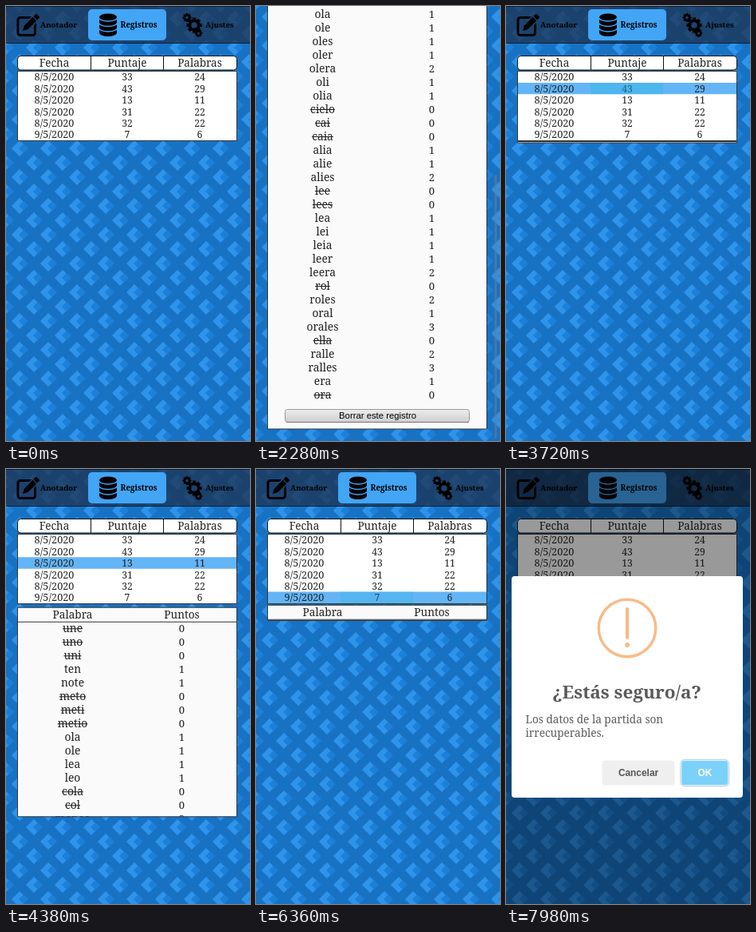
An HTML page with a canvas for the animation above (8000 ms loop, 306x544 px).

```html
<!DOCTYPE html>
<html lang="es">
<head>
<meta charset="utf-8">
<style>
html, body { margin: 0; width: 100%; height: 100%; overflow: hidden; background: #1872c4 }
canvas { display: block }
</style>
</head>
<body>
<canvas id="c" width="306" height="544"></canvas>
<script>
const W = 306, H = 544, LOOP = 8000, SLIDE = 300;
const g = document.getElementById('c').getContext('2d');
const SERIF = '"Noto Serif", serif', SANS = '"Liberation Sans", Arial, sans-serif';
const NAV = '#1c4270';

const games = [
  ['8/5/2020', 33, 24], ['8/5/2020', 43, 29], ['8/5/2020', 13, 11],
  ['8/5/2020', 31, 22], ['8/5/2020', 32, 22], ['9/5/2020', 7, 6]
];
// each word is followed by its points; zero means struck out
const words = {
  0: 'sal0 sol0 cal1 cola0 col0 rio1 sola0 cielos1 lio0 ola1 ole1 oles1 oler1 olera2 oli1 olia1 cielo0 cai0 caia0 alia1 alie1 alies2 lee0 lees0 lea1 lei1 leia1 leer1 leera2 rol0 roles2 oral1 orales3 ella0 ralle2 ralles3 era1 ora0',
  1: 'mar0 mares1 mesa1 mesas2 rama0 ramas1 amar1 amare2 sea0 seas1 arte1 artes2 tres0 tela1 telas2 meta0 metas1 tema1 temas2 rata1 ratas2 trama2 tramas3 lame1 lames2 alma0 almas1 mate1 mates2 alta1 altas2 resta2 restas3',
  2: 'une0 uno0 uni0 ten1 note1 meto0 meti0 metio0 ola1 ole1 lea1 leo1 cola0 col0 menee2 meneo2 ceno0 ene1 cene0 cole0 lee1 leen1',
  5: 'alma1 cala1 prisa2 gris1 asi1 para1'
};
for (const k in words) words[k] = words[k].split(' ').map(w => [w.slice(0, -1), w.slice(-1)]);

const taps = [[940, 0], [3712, 1], [4209, 2], [6292, 5]];   // time, row
const scrolls = [[0, 0], [1760, 0], [2280, 344.5], [2600, 344.5], [2940, 0],
  [4700, 0], [4920, 72.5], [5495, 72.5], [5700, 0]];
const bars = [[1760, 3340, 0], [4700, 5260, 2], [5495, 6040, 2]];   // shown from, until, row

const clamp = v => Math.max(0, Math.min(1, v));
const swing = v => .5 - Math.cos(clamp(v) * Math.PI) / 2;
const boxHeight = row => 52 + 17 * words[row].length;
const pageHeight = row => Math.max(H, 190.5 + boxHeight(row));

function track(keys, t) {
  let i = keys.length - 1;
  while (i && keys[i][0] > t) i--;
  const [t0, a] = keys[i], [t1, b] = keys[i + 1] || [LOOP, a];
  return a + (b - a) * swing((t - t0) / (t1 - t0));
}

function rect(x, y, w, h, fill, stroke, r = 0, lw = 1) {
  g.beginPath();
  g.roundRect(x, y, w, h, r);
  if (fill) { g.fillStyle = fill; g.fill(); }
  if (stroke) { g.strokeStyle = stroke; g.lineWidth = lw; g.stroke(); }
}

function text(s, x, y, size, { font = SERIF, weight = 400, color = '#222', align = 'center' } = {}) {
  g.font = `${weight} ${size}px ${font}`;
  g.fillStyle = color;
  g.textAlign = align;
  g.fillText(s, x, y);
}

function poly(pts, fill) {
  g.beginPath();
  pts.forEach(([x, y]) => g.lineTo(x, y));
  g.closePath();
  g.fillStyle = fill;
  g.fill();
}

function ellipse(x, y, rx, ry, fill) {
  g.beginPath();
  g.ellipse(x, y, rx, ry, 0, 0, 7);
  g.fillStyle = fill;
  g.fill();
}

const circle = (x, y, r, fill) => ellipse(x, y, r, r, fill);

const tile = document.createElement('canvas');
tile.width = tile.height = 36;
{
  const q = tile.getContext('2d');
  const diamond = (x, y, r, fill) => {
    q.fillStyle = fill;
    q.beginPath();
    q.moveTo(x - r, y); q.lineTo(x, y - r); q.lineTo(x + r, y); q.lineTo(x, y + r);
    q.fill();
  };
  q.fillStyle = '#1872c4';
  q.fillRect(0, 0, 36, 36);
  for (const [x, y] of [[18, 34], [18, -2], [0, 16], [36, 16]]) {
    diamond(x - 1, y, 10, '#2f93ea');
    diamond(x + 4, y, 6, '#1c7fd8');
  }
}
const pattern = g.createPattern(tile, 'repeat');

function gear(x, y, r, hole) {
  for (let i = 0; i < 8; i++) {
    g.save();
    g.translate(x, y);
    g.rotate(i * Math.PI / 4);
    rect(-r * .22, -r, r * .44, r, '#000');
    g.restore();
  }
  circle(x, y, r * .78, '#000');
  circle(x, y, hole, NAV);
}

function nav() {
  rect(0, 0, W, 47, 'rgba(29,50,81,.75)');
  rect(0, 0, W, 1, '#0c2238');
  rect(0, 46, W, 1, '#0c2238');
  rect(103, 4, 98, 39, '#42a5f5', null, 5);
  // pencil and sheet
  rect(15, 14.5, 21.5, 22, null, '#000', 3, 3);
  g.save();
  g.translate(21, 31);
  g.rotate(-Math.PI / 4);
  rect(-1, -5, 31, 10, NAV);
  poly([[0, 0], [6, -3.3], [21, -3.3], [21, 3.3], [6, 3.3]], '#000');
  rect(22.3, -3.3, 5, 6.6, '#000', null, 1.5);
  g.restore();
  // database
  rect(117, 14, 22, 19.5, '#000');
  ellipse(128, 14, 11, 4.5, '#000');
  ellipse(128, 33.5, 11, 4.5, '#000');
  g.strokeStyle = '#42a5f5';
  g.lineWidth = 1.4;
  for (const y of [14.5, 21, 27.5]) {
    g.beginPath();
    g.ellipse(128, y, 11.5, 4.5, 0, 0, Math.PI);
    g.stroke();
  }
  gear(227, 14.5, 5.5, 1.8);
  gear(236, 24, 9.5, 3.8);
  gear(241.5, 34, 4.8, 1.5);
  const bold = { weight: 700, color: '#000', align: 'left' };
  text('Anotador', 43, 27, 9.6, bold);
  text('Registros', 143.5, 27, 9.8, bold);
  text('Ajustes', 250, 27, 9.6, bold);
}

function gamesTable(row, age) {
  const cols = [60.5, 152, 243];
  rect(14.5, 62.5, 275, 17.5, '#fff', '#111', 4);
  rect(106, 63, 1, 17, '#111');
  rect(197, 63, 1, 17, '#111');
  ['Fecha', 'Puntaje', 'Palabras'].forEach((s, i) => text(s, cols[i], 76, 13.5));
  rect(14.5, 81.5, 275, 87, '#fff', '#333');
  games.forEach((cells, i) => {
    const y = 81.5 + 14.4 * i;
    if (i === row) rect(15, y, 274, 14.4, '#64b5f6');
    cells.forEach((s, k) => text(s, cols[k], y + 11.8, k ? 12.2 : 12.7));
    if (i === row && age < 110) rect(106, y, 91, 14.4, `rgba(51,181,229,${.45 * clamp((110 - age) / 60)})`);
  });
}

function detail(row, age, pressed) {
  const p = swing(age / SLIDE), top = 169 + 6 * p, h = Math.max(1.5, boxHeight(row) * p);
  g.save();
  rect(14.5, top + .5, 275, h, '#fafafa', '#333');
  g.clip();
  text('Palabra', 83.5, top + 14.5, 13.6);
  text('Puntos', 220.5, top + 14.5, 13.6);
  rect(15, top + 18, 274, 1, '#333');
  words[row].forEach(([s, n], i) => {
    const y = top + 31.5 + 17 * i;
    text(s, 83.5, y, 13.8);
    if (n === '0') {
      const w = g.measureText(s).width;
      rect(83.5 - w / 2, y - 5, w, 1, '#222');
    }
    text(n, 220.5, y, 13);
  });
  const by = top + boxHeight(row) - 24.5, shade = g.createLinearGradient(0, by, 0, by + 16);
  shade.addColorStop(0, pressed ? '#c8c8c8' : '#eee');
  shade.addColorStop(1, pressed ? '#dedede' : '#cfcfcf');
  rect(36.5, by + .5, 231, 16, shade, '#999', 3);
  if (pressed) rect(37, by, 230, 1, '#666');
  else rect(38, by + 16, 229, 1, '#777');
  text('Borrar este registro', 152.5, by + 12, 11.33, { font: SANS, color: '#000' });
  g.restore();
}

function scrollBar(t, pos) {
  for (const [from, until, row] of bars) {
    const a = clamp((t - from) / 60) * clamp(1 - (t - until) / 140);
    if (!a) continue;
    const page = pageHeight(row);
    rect(299, 3 + 538 * pos / page, 3, 538 * H / page, `rgba(110,120,135,${.6 * a})`);
  }
}

function dialog(age) {
  if (age <= 0) return;
  const a = clamp(age / 290), keys = [[0, .5], [.45, 1.05], [.8, .95], [1, 1]];
  rect(0, 0, W, H, `rgba(0,0,0,${.4 * a})`);
  g.save();
  g.globalAlpha = a;
  const s = a < 1 ? track(keys, a) : 1;
  g.translate(152, 272.5);
  g.scale(s, s);
  g.translate(-152, -272.5);
  rect(7, 134, 290, 277, '#fff', null, 4);
  const orange = '#f8bb86';
  g.strokeStyle = orange;
  g.lineWidth = 3.4;
  g.beginPath();
  g.arc(152, 199, 35.8, 0, 7);
  g.stroke();
  rect(150, 173, 4.2, 40, orange, null, 2);
  circle(152.1, 220, 3, orange);
  text('¿Estás seguro/a?', 151.5, 287, 22.5, { weight: 600, color: '#595959' });
  const body = { color: '#5c5c5c', align: 'left' };
  text('Los datos de la partida son', 24.5, 318, 13.6, body);
  text('irrecuperables.', 24.5, 335, 13.6, body);
  const label = { font: SANS, weight: 700 };
  rect(120.5, 364.5, 91, 31, '#efefef', null, 4);
  text('Cancelar', 166, 384, 11.9, { ...label, color: '#555' });
  rect(218.3, 362.8, 62, 34.4, 'rgba(43,114,165,.29)', null, 6);
  rect(219.5, 364, 59.6, 32, '#fff', null, 5);
  rect(220.2, 364.7, 58.2, 30.6, '#7cd1f9', null, 4);
  text('OK', 249.3, 384, 11.9, { ...label, color: '#fff' });
  g.restore();
}

function draw(t) {
  const pos = track(scrolls, t);
  const tap = taps.filter(k => k[0] <= t).pop();
  g.save();
  g.translate(0, -pos);
  rect(0, pos, W, H, pattern);
  nav();
  gamesTable(tap ? tap[1] : -1, tap ? t - tap[0] : 0);
  if (tap) detail(tap[1], t - tap[0], t >= 7620);
  g.restore();
  scrollBar(t, pos);
  dialog(t - 7670);
}

const start = performance.now();
(function frame() {
  draw((performance.now() - start) % LOOP);
  requestAnimationFrame(frame);
})();
</script>
</body>
</html>
```
